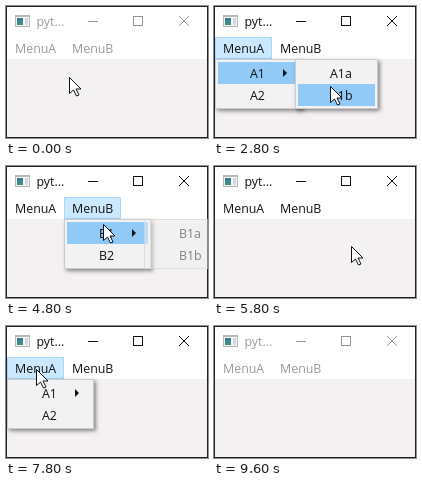
An HTML page with a canvas that plays this animation: 202 by 132 pixels, repeating every 9800 ms.

```html
<!DOCTYPE html>
<html>
<head>
<meta charset="utf-8">
<style>
  html, body { margin: 0; width: 100%; height: 100%; overflow: hidden; background: #fff; }
  canvas { display: block; }
</style>
</head>
<body>
<canvas id="stage" width="202" height="132"></canvas>
<script>
const ctx = document.getElementById('stage').getContext('2d');
const LOOP = 9800, STEP = 200;
const ROW_TOP = 56, ROW = 22, SUB_OFFSET = 80;
const MENU_X = { A: 1, B: 58 };
const bar = name => [MENU_X[name] + 29, 43];

// [time, pointer position, open menu]; the pointer glides from stop to stop
const stops = [
  [0, [63, 71], ''],
  [1000, bar('A'), 'A'],
  [1600, bar('A'), 'A'],
  [2000, [52, 66], 'A'],
  [2400, [108, 66], 'A'],
  [2800, [116, 80], 'A'],
  [3000, [116, 86], ''],
  [3800, bar('A'), 'A'],
  [4200, bar('B'), 'B'],
  [4600, [97, 58], 'B'],
  [4800, [97, 58], 'B'],
  [5200, [172, 66], 'B'],
  [5600, [172, 92], ''],
  [6400, bar('A'), 'A'],
  [7000, [97, 87], 'A'],
  [7200, [97, 87], ''],
  [7800, bar('A'), 'A'],
  [8000, bar('B'), 'B'],
  [8400, [21, 87], 'B'],
  [8800, [21, 100], ''],
  [9600, [21, 140], '']
];

// Pointer, open menu and hovered row at a given time
function stateAt(time) {
  const t = Math.max(0, time);
  const i = stops.findLastIndex(stop => stop[0] <= t);
  const [t0, from, open] = stops[i];
  const [t1, to] = stops[i + 1] || [LOOP, from];
  const [x, y] = from.map((v, axis) => Math.round(v + (to[axis] - v) * (t - t0) / (t1 - t0)));
  const over = open && x >= MENU_X[open] && y >= ROW_TOP && y < ROW_TOP + 2 * ROW;
  const row = over ? Math.floor((y - ROW_TOP) / ROW) : -1;
  const inSub = over && x >= MENU_X[open] + SUB_OFFSET;
  return { x, y, open, row, inSub, expands: inSub || row === 0 };
}

function rect(x, y, w, h, fill) {
  ctx.fillStyle = fill;
  ctx.fillRect(x, y, w, h);
}

function frame(x, y, w, h, color) {
  ctx.strokeStyle = color;
  ctx.strokeRect(x + .5, y + .5, w - 1, h - 1);
}

function label(text, x, y, color = '#111') {
  ctx.fillStyle = color;
  ctx.fillText(text, x, y);
}

function drawIcon() {
  rect(9, 9, 15, 12, '#b4b8ba');
  rect(10, 11, 13, 9, '#f4f5f5');
  const glass = ctx.createLinearGradient(11, 11, 17, 20);
  glass.addColorStop(0, '#3f6f9b');
  glass.addColorStop(1, '#3a9b80');
  rect(11, 12, 6, 7, glass);
  rect(19, 12, 3, 7, '#d4d8da');
}

function drawWindow(ink) {
  rect(0, 0, 202, 132, '#f4f1f3');
  rect(0, 0, 202, 53, '#fff');
  frame(0, 0, 202, 132, '#222');
  drawIcon();
  label('pyt...', 30.5, 20, ink);
  rect(82, 15, 10, 1, ink);
  frame(127, 10, 10, 10, ink);
  ctx.stroke(new Path2D('M173 10L183 20M183 10L173 20'));
}

function drawBar(ink, open) {
  for (const name in MENU_X) {
    const x = MENU_X[name];
    if (name === open) {
      rect(x, 31, 57, 22, '#cce8ff');
      frame(x, 31, 57, 22, '#a9d8ff');
    }
    label('Menu' + name, x + 8, 47, ink);
  }
}

function drawPanel(x, w, items, hot, opacity = 1) {
  ctx.save();
  ctx.globalAlpha = opacity;
  if (opacity === 1) {
    ctx.shadowColor = 'rgba(0,0,0,.45)';
    ctx.shadowBlur = 4;
    ctx.shadowOffsetX = ctx.shadowOffsetY = 2;
  }
  rect(x, 53, w, 50, '#f2f2f2');
  ctx.shadowColor = 'transparent';
  frame(x, 53, w, 50, '#ccc');
  items.forEach((text, i) => {
    const y = ROW_TOP + ROW * i;
    if (i === hot) rect(x + 3, y, w - 6, ROW, '#91c9f7');
    label(text, x + 35, y + 16);
  });
  ctx.restore();
}

function drawMenu(t, { open, row, inSub, expands }) {
  const x = MENU_X[open];
  drawPanel(x, 87, [open + 1, open + 2], inSub ? 0 : row);
  ctx.fillStyle = '#111';
  ctx.fill(new Path2D(`M${x + 68} 63l4 4l-4 4z`));

  // The submenu fades in over the two steps after its parent is hovered
  const earlier = [STEP, 2 * STEP].map(delay => stateAt(t - delay));
  const opacity = earlier.filter(s => s.open === open && s.expands).length / 2;
  if (expands && opacity) {
    drawPanel(x + SUB_OFFSET, 83, [open + '1a', open + '1b'], inSub ? row : -1, opacity);
  }
}

function drawPointer(x, y) {
  const arrow = new Path2D('M0 0V16L4 12.5L7 18.5L9.5 17.5L6.5 11.5H11.5Z');
  ctx.save();
  ctx.translate(x + .5, y + .5);
  ctx.fillStyle = '#fff';
  ctx.fill(arrow);
  ctx.strokeStyle = '#111';
  ctx.stroke(arrow);
  ctx.restore();
}

function draw(now) {
  const t = Math.floor(now % LOOP / STEP) * STEP;
  const state = stateAt(t);
  const ink = t >= 600 && t < 9400 ? '#111' : '#999';
  ctx.font = '12.4px "Open Sans", "Noto Sans", sans-serif';
  drawWindow(ink);
  drawBar(ink, state.open);
  if (state.open) drawMenu(t, state);
  drawPointer(state.x, state.y);
}

const start = performance.now();
function tick() {
  draw(performance.now() - start);
  requestAnimationFrame(tick);
}
tick();
</script>
</body>
</html>
```
